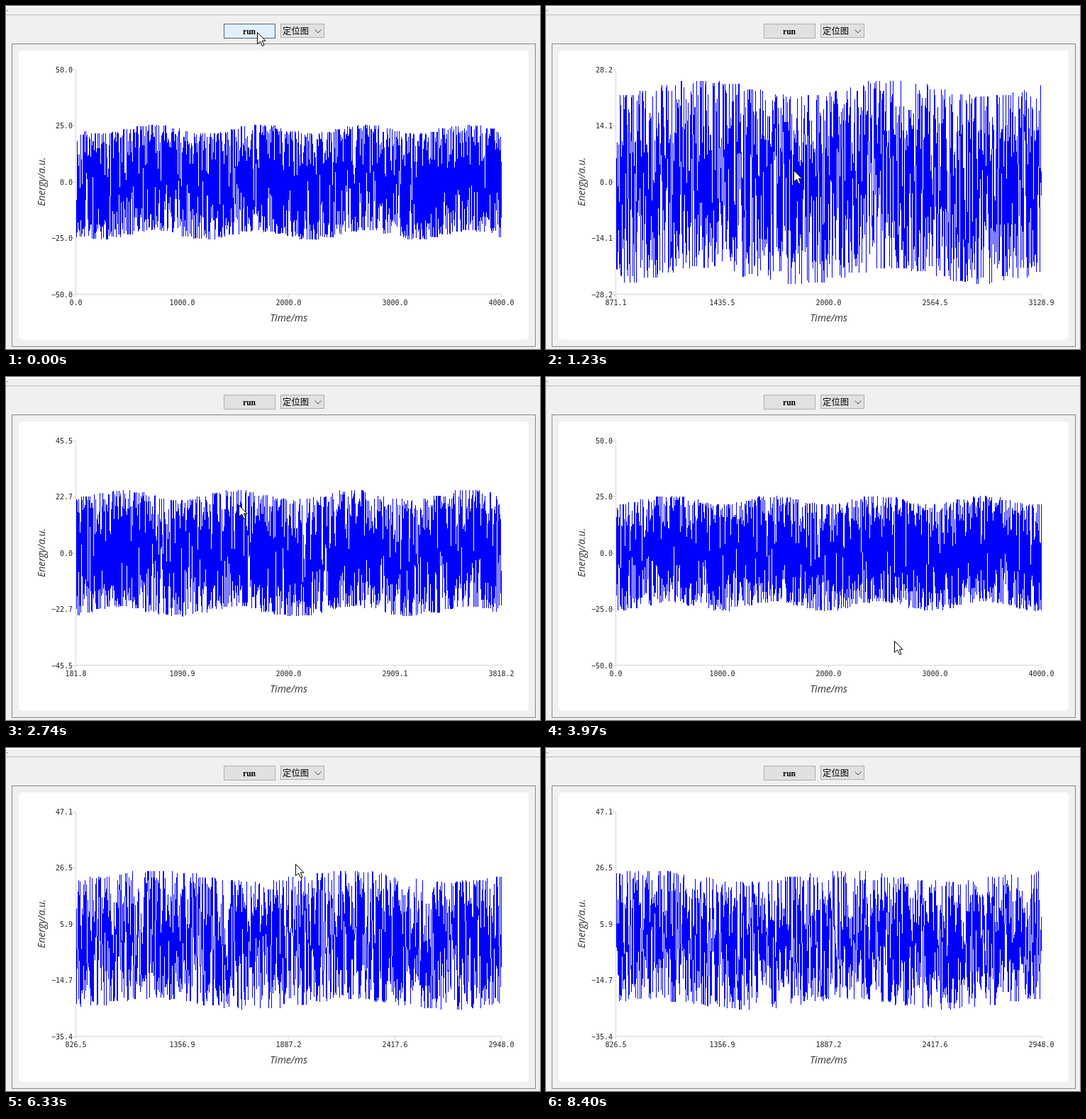
An HTML page with a canvas that plays this animation: 753 by 485 pixels, repeating every 8500 ms.

```html
<!DOCTYPE html>
<html>
<head>
<meta charset="utf-8">
<style>
  html, body { margin: 0; width: 100%; height: 100%; overflow: hidden; background: #f0f0f0; }
  canvas { display: block; }
</style>
</head>
<body>
<canvas id="stage" width="753" height="485"></canvas>
<script>
const ctx = document.getElementById('stage').getContext('2d');
const LOOP = 8500, REFRESHES = 62, STEP = LOOP / REFRESHES;
const PLOT = { x: 99, y: 90, w: 600, h: 318 };

// Pointer stops: arrival time, departure time, x, y.
const stops = [
  [0, 280, 354, 38], [560, 1240, 349, 233], [2700, 2760, 328, 182],
  [3250, 3470, 400, 428], [4250, 4450, 541, 345], [5100, 5560, 343, 38],
  [5930, 5960, 430, 430], [6290, 6340, 408, 165], [6600, 6880, 350, 38]
];

function pointerAt(t) {
  const i = stops.findIndex(stop => t <= stop[1]);
  if (i < 0) return null;
  const [arrive, , x, y] = stops[i];
  if (t >= arrive) return { x, y };
  const [, leave, fromX, fromY] = stops[i - 1];
  const k = (t - leave) / (arrive - leave);
  return { x: Math.round(fromX + (x - fromX) * k), y: Math.round(fromY + (y - fromY) * k) };
}

// Wheel zoom in and out about the centre, then a jump to a selected area.
function viewAt(t) {
  if (t >= 4300) return { x0: 826.5, x1: 2947.96, y0: -35.37, y1: 47.13 };
  const notches = (start, every) => Math.min(8, Math.max(0, Math.floor((t - start) / every)));
  const scale = 1.1 ** (notches(1670, 150) - notches(460, 127));
  return { x0: 2000 - 2000 * scale, x1: 2000 + 2000 * scale, y0: -50 * scale, y1: 50 * scale };
}

function random(seed) {
  return () => {
    seed = seed + 0x6d2b79f5 | 0;
    let r = Math.imul(seed ^ seed >>> 15, 1 | seed);
    r ^= r + Math.imul(r ^ r >>> 7, 61 | r);
    return ((r ^ r >>> 14) >>> 0) / 4294967296;
  };
}

function rect(x, y, w, h, color) {
  ctx.fillStyle = color;
  ctx.fillRect(x, y, w, h);
}

function box(x, y, w, h, fill, stroke) {
  rect(x, y, w, h, stroke);
  rect(x + 1, y + 1, w - 2, h - 2, fill);
}

function text(str, x, y, font, align = 'center', color = '#000') {
  ctx.font = font;
  ctx.textAlign = align;
  ctx.fillStyle = color;
  ctx.fillText(str, x, y);
}

function drawWindow(hover) {
  rect(0, 0, 753, 485, '#f0f0f0');
  rect(0, 0, 753, 2, '#fff');
  rect(0, 12, 753, 1, '#b9b9b9');
  rect(1, 6, 2, 1, '#888');
  box(307, 25, 73, 21, hover ? '#e0eff9' : '#e1e1e1', hover ? '#56636e' : '#adadad');
  text('run', 343, 40, 'bold 11.5px "Liberation Serif", serif');
  box(387, 25, 62, 20, '#e1e1e1', '#adadad');
  text('定位图', 390, 39.5, '12.4px "Noto Sans CJK SC", "Noto Sans CJK", sans-serif', 'left');
  ctx.strokeStyle = '#444';
  ctx.stroke(new Path2D('M435.5 33.5l4.5 4.5 4.5-4.5'));
  box(8, 53, 739, 429, '#f0f0f0', '#828790');
  ctx.fillStyle = '#fff';
  ctx.beginPath();
  ctx.roundRect(18, 63, 719, 409, 5);
  ctx.fill();
}

function drawAxes(v) {
  const line = '#d6d6d6', label = '10px "DejaVu Sans Mono", monospace';
  rect(98, 90, 1, 319, line);
  rect(98, 407, 601, 1, line);
  for (let i = 0; i < 5; i++) {
    const x = 98 + Math.round(i * 149.9), y = 90 + Math.round(i * 79.4);
    const xValue = v.x0 + (v.x1 - v.x0) * i / 4, yValue = v.y1 + (v.y0 - v.y1) * i / 4;
    rect(x, 408, 1, 4, line);
    rect(94, y, 4, 1, line);
    text(xValue.toFixed(1), x + 0.5, 423, label, 'center', '#222');
    text(yValue.toFixed(1).replace('-', '−'), 94, y + 4, label, 'right', '#222');
  }
  const title = 'italic 14px "Open Sans", sans-serif';
  text('Time/ms', 398.5, 446, title, 'center', '#333');
  ctx.save();
  ctx.translate(55, 248.5);
  ctx.rotate(-Math.PI / 2);
  text('Energy/a.u.', 0, 0, title, 'center', '#333');
  ctx.restore();
}

// Clipped noise on a slowly wandering offset, drawn as crisp vertical runs.
function drawSignal(v, seed) {
  const rnd = random(seed * 7919 + 13);
  const phase = rnd() * 6.28;
  ctx.save();
  ctx.beginPath();
  ctx.rect(PLOT.x, PLOT.y, PLOT.w, PLOT.h);
  ctx.clip();
  ctx.fillStyle = '#00f';
  let lastX, lastY;
  for (let time = 0; time <= 4000; time += 1.4) {
    const offset = 2 * Math.sin(Math.floor(time / 110) * 0.7 + phase);
    const noise = Math.max(-23.5, Math.min(23.5, Math.round(rnd() * 52 - 26)));
    const x = PLOT.x + (time - v.x0) / (v.x1 - v.x0) * PLOT.w;
    const y = PLOT.y + (v.y1 - noise - offset) / (v.y1 - v.y0) * PLOT.h;
    if (time > 0 && x >= PLOT.x && lastX <= PLOT.x + PLOT.w) {
      const at = px => lastY + (y - lastY) * (px - lastX) / (x - lastX);
      for (let col = Math.floor(lastX); col <= Math.floor(x); col++) {
        const a = at(Math.max(col, lastX)), b = at(Math.min(col + 1, x));
        const top = Math.round(Math.min(a, b));
        ctx.fillRect(col, top, 1, Math.max(1, Math.round(Math.max(a, b)) - top));
      }
    }
    lastX = x;
    lastY = y;
  }
  ctx.restore();
}

function drawPointer({ x, y }) {
  ctx.save();
  ctx.translate(x + 0.5, y - 0.5);
  const arrow = new Path2D('M0 0V16L4 12.5L7 19L9.5 18L6.7 11.7H11.5Z');
  ctx.fillStyle = '#fff';
  ctx.fill(arrow);
  ctx.strokeStyle = '#000';
  ctx.stroke(arrow);
  ctx.restore();
}

let shown = -1;
function frame(now) {
  const index = Math.floor((now % LOOP + 10) / STEP) % REFRESHES;
  if (index !== shown) {
    shown = index;
    const time = index * STEP, pointer = pointerAt(time);
    const view = viewAt(time);
    drawWindow(pointer && pointer.y >= 25 && pointer.y < 46 && pointer.x >= 307 && pointer.x < 380);
    drawAxes(view);
    drawSignal(view, index);
    if (pointer) drawPointer(pointer);
  }
  requestAnimationFrame(frame);
}
requestAnimationFrame(frame);
</script>
</body>
</html>
```
